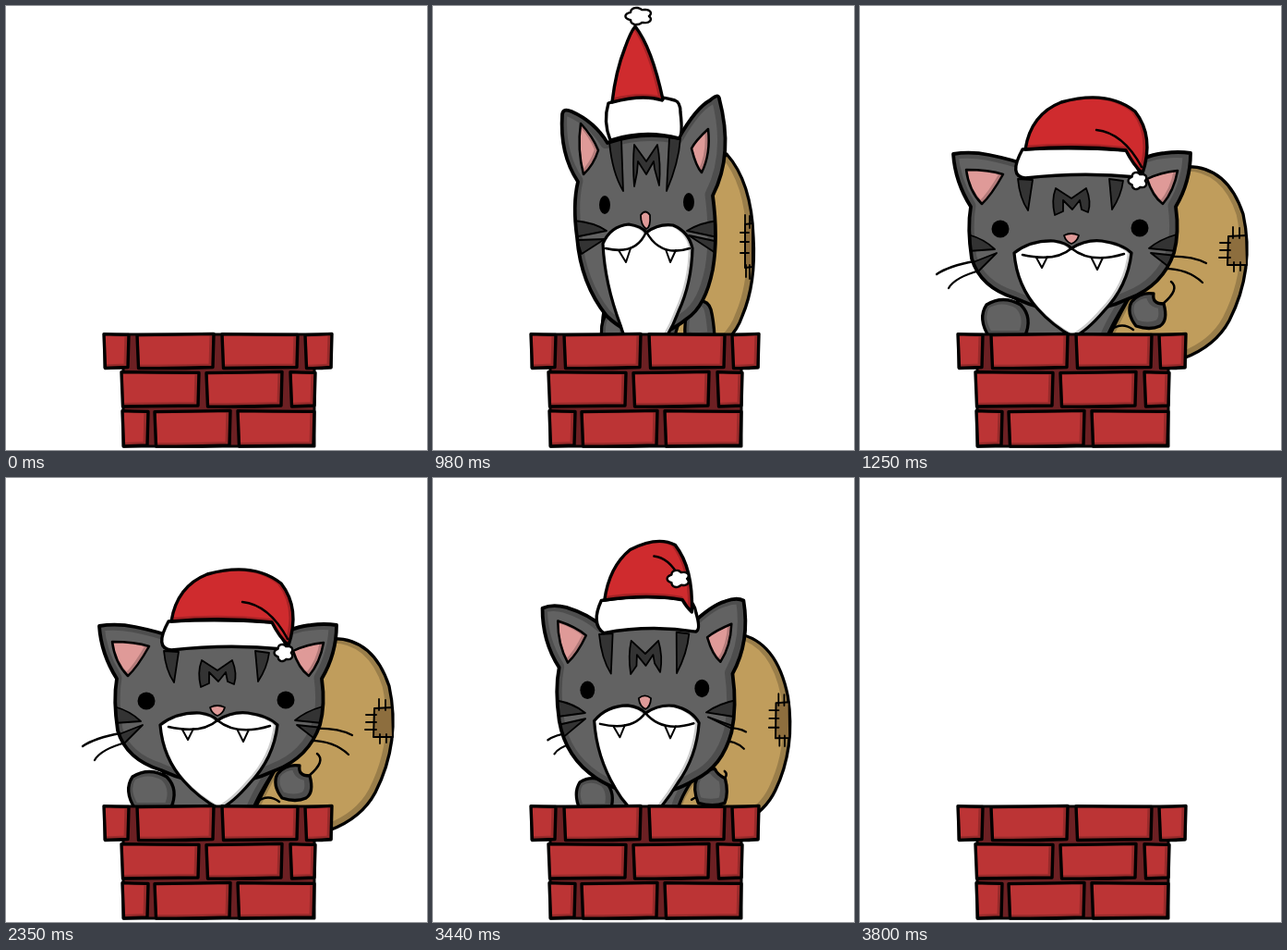
Recreate the animation shown at these times as an HTML page with a canvas. Size 456 by 480 pixels, loop 4600 ms.

```html
<!DOCTYPE html>
<html lang="en">
<head>
<meta charset="utf-8">
<title>Chimney cat</title>
<style>
html, body { margin: 0; width: 100%; height: 100%; overflow: hidden; background: #fff; }
canvas { display: block; }
</style>
</head>
<body>
<canvas id="stage" width="456" height="480"></canvas>
<script>
const ctx = document.getElementById('stage').getContext('2d');
const LOOP = 4600;
const GREY = '#626262', DARK = '#333', TAN = '#c09d5c', RED = '#cf2b2e', PINK = '#df9a98';

// Poses of each part, in this order. The first three share their commands, so they can be blended.
// A part without a peeking pose is hidden behind the chimney there.
const NORMAL = 0, TALL = 1, FLAT = 2, PEEK = 3;
const parts = {
  bag: [
    'M340,175 Q395,165 415,225 Q428,285 400,340 Q385,368 350,381 Q300,385 268,362 Q275,345 290,318 Q300,200 340,175Z',
    'M318,160 Q345,190 347,250 Q350,300 335,335 Q330,350 318,362 Q290,365 258,362 Q256,345 270,335 Q280,200 318,160Z',
    'M365,230 Q435,238 453,285 Q458,325 415,347 Q390,358 350,358 Q300,362 272,358 Q275,350 300,340 Q330,260 365,230Z'],
  patch: [
    'M399,249 L418,248 L419,280 L398,280Z',
    'M338,236 L346,235 L346,282 L338,283Z',
    'M419,283 L451,279 L452,299 L420,301Z'],
  stitches: [
    'M390,256 L401,256 M390,264 L401,264 M389,272 L401,272 M404,239 L404,251 M411,240 L411,251 M405,277 L405,287 M412,277 L412,286',
    'M333,245 L342,245 M333,255 L342,255 M333,267 L342,267 M338,226 L338,240 M343,227 L343,240 M339,280 L339,293 M343,280 L343,295',
    'M412,288 L424,287 M411,293 L424,293 M411,298 L424,298 M431,274 L431,285 M441,273 L441,284 M430,297 L430,302 M441,296 L441,301'],
  fold: [
    'M337,298 Q347,306 328,322 M272,350 Q284,341 296,350',
    'M290,340 Q290,340 290,340 M290,345 Q290,345 290,345',
    'M293,350 Q293,350 293,350 M293,352 Q293,352 293,352'],
  whiskers: [
    'M124,276 Q96,281 83,290 M130,286 Q103,293 96,305 M326,271 Q358,269 375,278 M326,284 Q354,283 371,299',
    'M180,274 Q175,274 175,275 M180,286 Q175,290 175,290 M290,269 Q295,269 295,270 M290,284 Q295,284 295,285',
    'M122,320 Q101,328 93,344 M126,325 Q104,338 102,358 M342,310 Q368,305 383,313 M338,318 Q363,319 378,330'],
  body: [
    'M168,308 Q175,335 180,362 Q225,362 266,362 Q272,345 292,314Z',
    'M185,330 Q183,340 183,362 Q225,362 262,362 Q262,345 275,330Z',
    'M175,345 Q190,362 195,362 Q225,362 270,362 Q272,350 280,345Z'],
  leftArm: [
    'M140,358 Q127,338 137,323 Q155,312 174,323 Q188,337 178,358Z',
    'M183,360 Q181,345 186,336 Q195,330 205,338 Q210,345 210,360Z',
    'M162,360 Q163,348 170,346 Q178,344 188,348 Q195,352 197,360Z'],
  rightArm: [
    'M299,346 Q288,332 294,320 Q303,309 318,311 Q316,322 329,322 Q334,340 325,346 Q314,351 299,346Z',
    'M273,358 Q272,340 276,330 Q283,319 290,319 Q298,319 301,328 Q304,340 305,358 Q290,362 273,358Z',
    'M270,358 Q272,345 280,343 Q285,338 293,338 Q305,340 309,346 Q314,352 315,358 Q290,362 270,358Z'],
  head: [
    'M101,160 Q120,157 140,161 Q165,166 180,172 Q235,160 290,172 Q315,160 330,159 Q345,157 358,159 Q358,190 342,217 Q346,245 340,267 Q328,302 292,316 Q230,345 168,316 Q130,304 121,273 Q116,240 120,217 Q103,190 101,160Z',
    'M140,117 Q141,110 150,114 Q175,125 189,148 Q228,135 266,143 Q285,110 300,102 Q309,94 310,100 Q326,160 303,205 Q309,250 303,285 Q295,325 275,338 Q230,375 188,335 Q160,300 156,250 Q151,215 157,190 Q137,160 140,117Z',
    'M85,210 Q88,204 115,209 Q145,213 170,228 Q230,215 290,235 Q310,217 330,215 Q350,212 367,215 Q368,245 346,272 Q362,285 354,305 Q345,330 300,345 Q230,362 165,335 Q120,328 102,308 Q90,288 97,265 Q80,245 85,210Z',
    'M151,233 Q151,225 160,232 Q181,243 191,260 Q226,252 264,260 Q276,234 295,226 Q302,221 303,229 Q310,262 297,310 Q299,330 298,356 L292,385 L168,385 L161,356 Q160,325 165,304 Q152,270 151,233Z'],
  stripes: [
    'M171,187 L187,188 L182,221 Q173,208 171,187Z M270,187 L285,189 Q283,205 273,220Z M117,247 Q135,252 146,263 L117,265Z M120,278 L148,267 L124,291Z M343,247 Q325,252 313,262 L343,265Z M343,270 L315,267 L337,284Z',
    'M191,147 L204,144 L206,200 Q194,180 191,147Z M256,142 L268,143 Q266,170 253,200Z M153,232 Q175,234 188,243 L153,250Z M156,253 L186,252 L161,268Z M309,232 Q290,234 275,243 L308,250Z M306,267 L277,248 L305,254Z',
    'M154,224 L188,227 L185,259 Q166,249 154,224Z M272,243 L292,244 Q286,257 271,262Z M92,281 Q106,283 116,289 L95,294Z M98,299 L122,301 L106,312Z M358,289 Q345,291 335,297 L357,302Z M354,307 L334,302 L345,319Z',
    'M190,260 L202,258 L207,308 Q194,290 190,260Z M253,258 L265,260 Q264,285 253,309Z M158,338 Q176,338 188,345 L158,352Z M301,336 Q286,338 276,346 L301,352Z'],
  mark: [
    'M211,226 Q207,210 212,197 L229,208 L245,197 Q251,212 247,223 L240,220 L238,210 L230,220 L220,210 L220,222Z',
    'M218,195 Q216,170 218,150 L231,168 L243,150 Q247,170 245,194 L240,176 L239,168 L231,182 L222,168 L221,180Z',
    'M200,256 Q199,245 203,235 L230,244 L254,235 Q262,243 264,251 L253,249 L248,244 L231,254 L212,244 L210,252Z',
    'M218,294 Q216,280 219,270 L229,282 L239,270 Q242,282 241,293 L236,286 L235,283 L229,293 L223,283 L222,287Z'],
  ears: [
    'M115,177 Q140,177 155,182 Q142,205 132,214 Q118,200 115,177Z M344,178 Q325,180 311,187 Q317,206 328,214 Q340,200 344,178Z',
    'M160,127 Q173,141 179,156 Q174,172 163,182 Q156,155 160,127Z M298,133 Q284,146 280,154 Q285,174 291,180 Q301,160 298,133Z',
    'M98,226 Q120,227 137,238 Q122,261 104,269 Q96,250 98,226Z M355,230 Q330,232 315,241 Q329,259 347,265 Q356,250 355,230Z',
    'M163,246 Q179,262 187,279 Q180,290 173,292 Q163,270 163,246Z M292,247 Q280,256 274,266 Q279,286 286,292 Q295,272 292,247Z'],
  beard: [
    'M167,267 Q185,253 210,254 Q224,256 229,262 Q245,252 262,254 Q284,257 294,267 Q290,303 264,330 Q245,352 231,358 Q208,345 193,328 Q170,303 167,267Z',
    'M184,257 Q192,238 212,236 Q226,238 231,245 Q244,235 260,237 Q277,244 281,262 Q280,300 266,330 Q255,360 231,390 Q210,370 203,345 Q186,300 184,257Z',
    'M130,304 Q160,298 195,298 Q222,298 230,303 Q255,297 290,297 Q330,299 335,306 Q330,335 290,343 Q260,355 228,358 Q190,357 170,343 Q135,325 130,304Z',
    'M206,360 Q218,347 229,346 Q241,348 250,360 L245,380 L211,380Z'],
  mouth: [
    'M176,269 Q212,277 229,262 Q250,279 286,268',
    'M187,262 Q220,270 231,244 Q246,272 278,262',
    'M136,307 Q197,331 230,303 Q275,332 330,307'],
  fangs: [
    'M191,272 L197,283 L203,271 M251,273 L257,285 L263,272',
    'M201,264 L209,277 L214,262 M252,263 L257,277 L263,264',
    'M168,317 L178,331 L195,317 M264,317 L283,327 L288,316'],
  nose: [
    'M221,248 Q229,244 237,248 Q235,255 229,257 Q223,255 221,248Z',
    'M225,226 Q230,219 235,226 Q236,239 231,241 Q225,237 225,226Z',
    'M213,296 Q230,290 247,295 Q239,302 230,303 Q220,302 213,296Z',
    'M220,330 Q228,325 236,330 Q235,341 228,345 Q221,341 220,330Z'],
  brim: [
    'M176,155 Q235,152 288,156 Q295,159 299,172 Q306,184 300,185 Q240,179 179,186 Q160,184 176,155Z',
    'M190,105 Q228,92 262,102 Q268,104 268,115 Q271,140 266,143 Q230,133 192,145 Q184,125 190,105Z',
    'M152,212 Q205,187 255,204 Q300,205 308,214 Q308,228 296,230 Q220,212 163,230 Q150,228 152,212Z',
    'M190,237 Q226,225 254,230 Q264,231 264,240 Q267,255 260,257 Q226,251 195,258 Q183,252 190,237Z'],
  hat: [
    'M179,155 Q185,117 218,104 Q268,90 298,114 Q319,141 306,181 Q296,172 288,156 Q235,150 179,155Z',
    'M194,104 Q198,70 208,45 Q214,28 219,22 Q237,45 249,101 Q249,101 248,102 Q228,95 194,104Z',
    'M160,208 Q185,168 230,167 Q275,168 290,188 Q300,205 293,233 Q270,215 255,203 Q210,190 160,208Z',
    'M192,235 Q194,195 207,163 Q215,145 224,140 Q243,175 253,230 Q226,225 192,235Z'],
  crease: [
    'M256,134 Q285,137 305,174',
    'M219,24 Q219,24 219,24',
    'M237,193 Q277,200 292,231'],
  // centre x, centre y, radius x, radius y
  pom: ['301,189,10,9', '223,11,14,9', '289,239,20,9', '221,129,10,14'],
  leftEye: ['152,241,9.5,9.5', '186,215,6,10', '129,293,12,6', '189,318,6,10'],
  rightEye: ['303,240,9.5,9.5', '277,212,6,10', '321,287,12,6', '266,318,6,10']
};

function blend(name, { from, to = from, mix = 0 }) {
  const start = parts[name][from];
  if (!start) return '';
  const ends = parts[name][to].match(/[\d.]+/g);
  let i = 0;
  return start.replace(/[\d.]+/g, n => +n + (ends[i++] - n) * mix);
}

function line(path, width) {
  ctx.strokeStyle = '#000';
  ctx.lineWidth = width;
  ctx.stroke(path);
}

function shape(path, fill, width = 3, shade = 0) {
  ctx.fillStyle = fill;
  ctx.fill(path);
  if (shade) {
    ctx.save();
    ctx.clip(path);
    ctx.translate(-1.5, -1);
    ctx.strokeStyle = 'rgba(0,0,0,.2)';
    ctx.lineWidth = shade;
    ctx.stroke(path);
    ctx.restore();
  }
  if (width) line(path, width);
}

function cloud([x, y, rx, ry]) {
  const path = new Path2D();
  for (let a = 0; a < 6.28; a += 0.1) {
    const r = 0.78 + 0.26 * Math.abs(Math.sin(2.5 * a));
    path.lineTo(x + rx * r * Math.cos(a), y + ry * r * Math.sin(a));
  }
  path.closePath();
  return path;
}

function eye([x, y, rx, ry], closed) {
  const path = new Path2D();
  if (closed) {
    path.moveTo(x - rx, y);
    path.quadraticCurveTo(x, y + 5, x + rx, y);
    line(path, 3);
  } else {
    path.ellipse(x, y, rx, ry, 0, 0, 7);
    shape(path, '#000', 0);
  }
}

function drawCat(pose, blink) {
  const path = name => new Path2D(blend(name, pose));
  const numbers = name => blend(name, pose).split(',').map(Number);
  ctx.save();
  ctx.beginPath();
  ctx.rect(0, 0, 456, 400);
  ctx.clip();
  ctx.translate(0, pose.drop || 0);
  if (pose.from === PEEK) {
    ctx.fillStyle = '#000';
    ctx.fillRect(332.5, 170.5, 3, 2.5);
  }
  shape(path('bag'), TAN, 3.3, 12);
  shape(path('patch'), '#8d6e3e', 2);
  line(path('stitches'), 1.8);
  line(path('fold'), 2.5);
  line(path('whiskers'), 2.3);
  for (const name of ['body', 'leftArm', 'rightArm']) shape(path(name), GREY, 3.3, 12);
  const head = path('head');
  shape(head, GREY, 0, 14);
  ctx.save();
  ctx.clip(head);
  shape(path('stripes'), DARK, 1.8);
  ctx.restore();
  line(head, 3.8);
  shape(path('mark'), DARK, 1.8);
  shape(path('ears'), PINK, 2.5, 5);
  shape(path('beard'), '#fff', 3.2, 5);
  shape(path('fangs'), '#fff', 2);
  line(path('mouth'), 2.5);
  shape(path('nose'), PINK, 1.8);
  eye(numbers('leftEye'), blink);
  eye(numbers('rightEye'), blink);
  shape(path('brim'), '#fff', 3.4);
  shape(path('hat'), RED, 3.4, 6);
  line(path('crease'), 2.4);
  shape(cloud(numbers('pom')), '#fff', 2.4);
  ctx.restore();
}

const rows = [
  [355, 391.5, [[106, 133], [142, 225], [234, 316], [324, 353]]],
  [396, 433, [[125, 209], [217, 299], [308, 335]]],
  [438, 476, [[126, 154], [161, 243], [251, 334]]]
];

function drawChimney() {
  const mortar = new Path2D('M107,355 H352 V391 H334 V476 H127 V391 H107Z');
  shape(mortar, '#6c2023', 3);
  rows.forEach(([top, bottom, bricks]) => bricks.forEach(([x0, x1], i) => {
    const wobble = i % 2 ? 0.6 : -0.4;
    const middle = (x0 + x1) / 2;
    const brick = new Path2D(`M${x0},${top + wobble} Q${middle},${top + 0.5} ${x1},${top - wobble}
      L${x1 - 1},${bottom - 1} Q${middle},${bottom + wobble} ${x0 + 1.5},${bottom}Z`);
    shape(brick, '#bc3435', 3.4, 6);
  }));
}

const normal = { from: NORMAL }, tall = { from: TALL }, flat = { from: FLAT };
const middle = { from: TALL, to: NORMAL, mix: 0.55 };
const peek = { from: PEEK }, tip = { from: PEEK, drop: 125 };
const timeline = [
  [0, null], [800, tip], [890, peek], [980, tall], [1070, middle], [1160, flat], [1250, normal],
  [3350, flat], [3440, middle], [3530, tall], [3620, peek], [3710, tip], [3800, null]
];

function draw(t) {
  ctx.fillStyle = '#fff';
  ctx.fillRect(0, 0, 456, 480);
  ctx.lineCap = ctx.lineJoin = 'round';
  const pose = timeline.filter(([start]) => start <= t).pop()[1];
  if (pose) drawCat(pose, t >= 2250 && t < 2350);
  drawChimney();
}

const begin = performance.now();
function tick() {
  draw((performance.now() - begin) % LOOP);
  requestAnimationFrame(tick);
}
tick();
</script>
</body>
</html>
```
